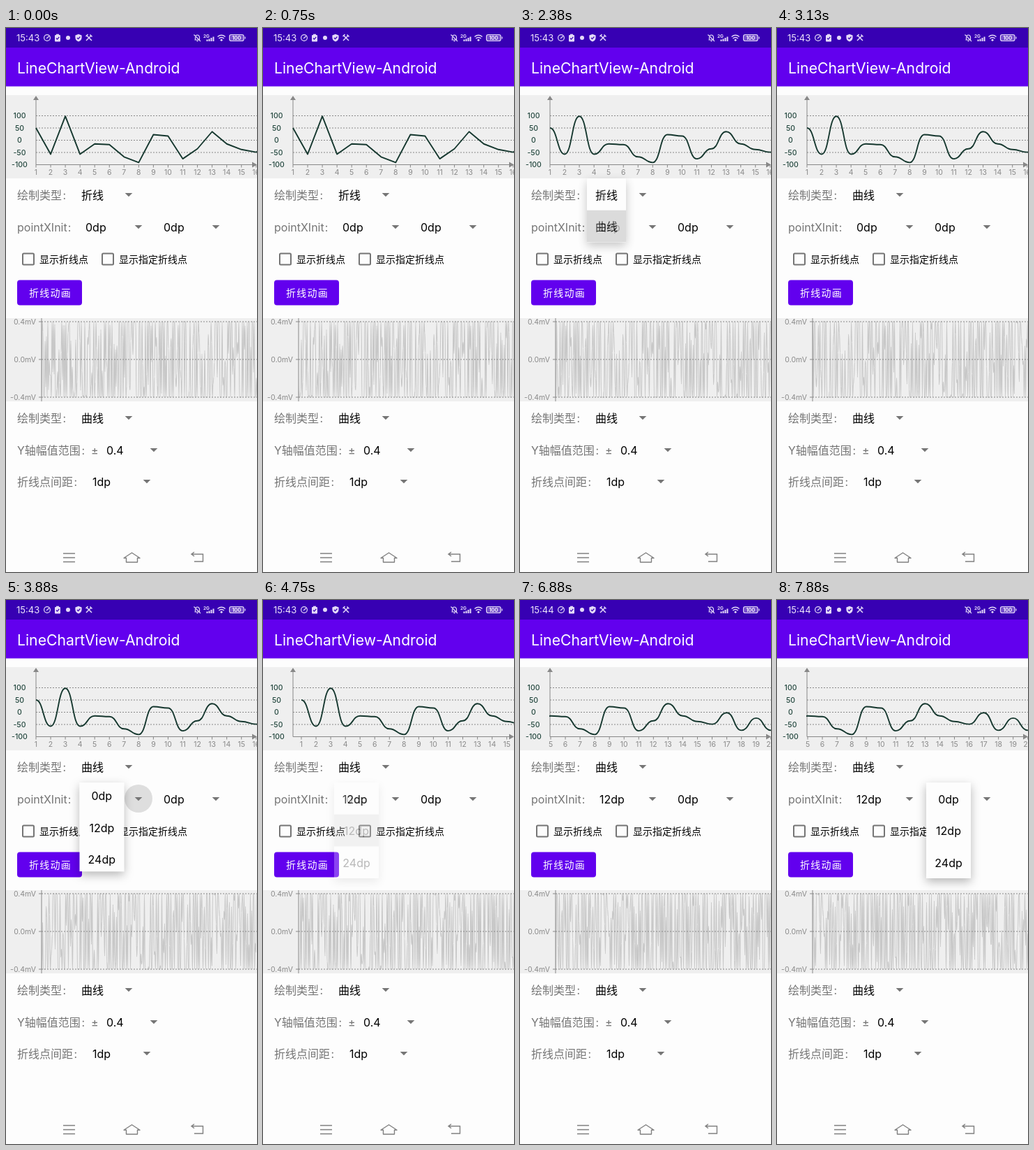
An HTML page for the animation above (8000 ms loop, 360 by 778 pixels).

```html
<!DOCTYPE html>
<html lang="zh-CN">
<head>
<meta charset="utf-8">
<title>LineChartView-Android</title>
<style>
html, body { margin: 0; width: 100%; height: 100%; overflow: hidden; background: #fdfdfd; }
svg { display: block; width: 100vw; height: 100vh; font: 16px Inter, "Noto Sans CJK SC", "Noto Sans CJK", sans-serif; }
.label { fill: #757575; }
.small { font-size: 14px; }
.tick { font-size: 10.5px; fill: #8a8a8a; }
.level { fill: #24483f; font-weight: 500; }
.mid { text-anchor: middle; }
.end { text-anchor: end; }
.axis { stroke: #888; fill: none; }
.dash { stroke-dasharray: 2 2; }
.arrow { fill: #757575; }
.icon { fill: none; stroke: #e4daf8; stroke-width: 1.2; }
.solid { fill: #e4daf8; stroke: none; }
.nav { fill: none; stroke: #808080; stroke-width: 1.4; }
.box { fill: none; stroke: #757575; stroke-width: 2; }
.ripple { fill: #dedede; }
</style>
</head>
<body>
<svg viewBox="0 0 360 778">
  <defs>
    <clipPath id="plot"><rect x="42" y="96" width="318" height="119"/></clipPath>
    <clipPath id="ticks"><rect x="38" y="190" width="322" height="25"/></clipPath>
    <clipPath id="wavePlot"><rect x="51" y="415" width="309" height="119"/></clipPath>
    <clipPath id="menuClip"><rect id="menuMask"/></clipPath>
    <filter id="shadow" x="-60%" y="-40%" width="220%" height="180%">
      <feDropShadow dx="0" dy="5" stdDeviation="7" flood-opacity=".28"/>
    </filter>
  </defs>

  <rect width="360" height="778" fill="#fdfdfd"/>
  <rect width="360" height="28" fill="#3700b3"/>
  <rect y="28" width="360" height="55.5" fill="#6200ee"/>
  <text x="16" y="64.5" font-size="21.2" fill="#fff">LineChartView-Android</text>

  <!-- status bar -->
  <text id="clock" x="15" y="19" font-size="13" fill="#eee6fb"></text>
  <g class="icon">
    <circle cx="59" cy="14" r="4.4"/><path d="M58 15l4-3.5"/>
    <rect class="solid" x="70" y="10" width="8" height="9.5" rx="1"/>
    <rect class="solid" x="72" y="8.7" width="4" height="2"/>
    <path d="M72 14.5l1.5 1.6 2.8-3.2" stroke="#3700b3"/>
    <circle class="solid" cx="89" cy="14" r="3"/>
    <path class="solid" d="M104 8.8l4.6 1.8v3.2q0 4-4.6 5.7-4.6-1.7-4.6-5.7v-3.2z"/>
    <path d="M102 14l1.6 1.7 2.8-3.2" stroke="#3700b3"/>
    <path d="M115 18l7-7M123 18l-7-7M114.5 12l3-3M120.5 9.5l3 3" stroke-width="1.5"/>
    <path d="M270.5 17h7.5M271.5 17v-4q.5-3 3-3 2.5 0 3 3v4M273.5 18.7h2M269.5 9.5l9.5 9.5"/>
    <path d="M288.5 19v-2.5M291.5 19v-3.5M294.5 19v-5M297.5 19v-6.5" stroke-width="2"/>
    <path d="M303.5 12.5q5.5-4.5 11 0M305.3 15q3.7-3 7.4 0" stroke-width="1.5"/>
    <circle class="solid" cx="309" cy="17.3" r="1.5"/>
    <rect x="320.5" y="9.5" width="20.5" height="9" rx="2.5" fill="#e4daf8" fill-opacity=".35"/>
    <path d="M343 12.5v3"/>
  </g>
  <text x="283" y="14" font-size="6.5" font-weight="700" fill="#e4daf8">2G</text>
  <text x="330.7" y="16.7" font-size="7.5" font-weight="600" class="mid" fill="#fff">100</text>

  <!-- upper chart -->
  <rect y="96" width="360" height="119" fill="#efefef"/>
  <g id="grid"></g>
  <g clip-path="url(#ticks)"><g id="scale"></g></g>
  <path class="axis" d="M43 100V195.5H356"/>
  <path fill="#888" d="M43 97l-4 6h8zM360 195.5l-7-4v8z"/>
  <g clip-path="url(#plot)"><path id="line" fill="none" stroke="#16382f" stroke-width="1.9" stroke-linejoin="round"/></g>

  <!-- controls -->
  <g class="label">
    <text x="16" y="245">绘制类型<tspan dx="1.5">:</tspan></text>
    <text x="16" y="290.5">pointXInit<tspan dx="1">:</tspan></text>
    <text x="16" y="564">绘制类型<tspan dx="1.5">:</tspan></text>
    <text x="16" y="609.5">Y轴幅值范围<tspan dx="1.5">:</tspan></text>
    <text x="122" y="609.5">±</text>
    <text x="16" y="655">折线点间距<tspan dx="1.5">:</tspan></text>
  </g>
  <text id="kind" x="108" y="245"></text>
  <text id="inset" x="114" y="290.5"></text>
  <text x="226" y="290.5">0dp</text>
  <text x="108" y="564">曲线</text>
  <text x="144" y="609.5">0.4</text>
  <text x="124" y="655">1dp</text>
  <circle id="ripple" class="ripple" r="20"/>
  <g id="arrows" class="arrow"></g>
  <rect class="box" x="24" y="322.5" width="16" height="16" rx="1.5"/>
  <rect class="box" x="138" y="322.5" width="16" height="16" rx="1.5"/>
  <text class="small" x="48" y="336">显示折线点</text>
  <text class="small" x="162" y="336">显示指定折线点</text>
  <rect x="16" y="360.5" width="93" height="36" rx="4" fill="#6200ee"/>
  <text class="small" x="33" y="384" fill="#fff" font-weight="500" letter-spacing="1.25">折线动画</text>

  <!-- lower chart -->
  <rect y="415" width="360" height="119" fill="#efefef"/>
  <g clip-path="url(#wavePlot)"><path id="wave" fill="none" stroke="#c8c8c8" stroke-width="1.1"/></g>
  <g id="waveGrid"></g>
  <path class="axis" d="M51 415V534"/>

  <!-- navigation bar -->
  <path class="nav" d="M82 751.5h17M82 757.5h17M82 763.5h17"/>
  <path class="nav" d="M180.5 750.5l11.5 7.500h-3.500v6h-16v-6h-3.500z" stroke-linejoin="round"/>
  <path class="nav" d="M270 749.5l-4 3 4 3M266 752.5h16.500v10.500h-12.500"/>

  <g id="menu" filter="url(#shadow)"><g clip-path="url(#menuClip)">
    <rect id="sheet" fill="#fdfdfd"/>
    <rect id="picked" height="45.7" fill="#d3d3d3"/>
    <g id="items" class="mid"></g>
  </g></g>
</svg>
<script>
const LOOP = 8000, STEP = 125, UNIT = 21.05, ROW = 45.7;
const levels = [50, -57, 98, -57, -15, -18, -68, -91, 23, 17, -76, -35, 35, -15, -38, -49, -2, -74, -24, -74, -40];
const DP = ['0dp', '12dp', '24dp'];
const menus = [
  { open: 1383, close: 2345, x: 96, y: 215, w: 56, rows: ['折线', '曲线'], pick: 1, knob: [176, 238] },
  { open: 3721, close: 4640, x: 102, y: 261, w: 64, rows: DP, pick: 1, knob: [190, 284] },
  { open: 7420, close: 9000, x: 214, y: 261, w: 64, rows: DP, pick: 1, knob: [301, 284] }
];
const $ = id => document.getElementById(id);
const clamp = (v, lo = 0, hi = 1) => Math.min(hi, Math.max(lo, v));
const set = (el, attrs) => { for (const k in attrs) el.setAttribute(k, attrs[k]); };
const levelY = v => 160.5 - v * 0.35;

function hash(n) {
  const s = Math.sin(n * 127.1 + 31.7) * 43758.5453;
  return s - Math.floor(s);
}

// Cubic segments with level tangents, or plain straight segments.
function trace(points, smooth) {
  return points.map(([x, y], i) => {
    if (!i) return `M${x} ${y}`;
    if (!smooth) return `L${x} ${y}`;
    const [px, py] = points[i - 1], m = (px + x) / 2;
    return `C${m} ${py} ${m} ${y} ${x} ${y}`;
  }).join('');
}

function buildStatic() {
  $('grid').innerHTML = [100, 50, 0, -50, -100].map(v => {
    const y = levelY(v);
    const rule = v > -100 ? `<path class="axis dash" d="M43 ${y}H360"/>` : '';
    return `${rule}<text class="tick level mid" x="19.5" y="${y + 3.8}">${v}</text>`;
  }).join('');
  $('scale').innerHTML = levels.map((_, i) => {
    const x = 43 + i * UNIT;
    return `<path class="axis" d="M${x} 195.5v4"/><text class="tick mid" x="${x}" y="210">${i + 1}</text>`;
  }).join('');
  $('waveGrid').innerHTML = ['0.4mV', '0.0mV', '-0.4mV'].map((s, i) => {
    const y = 420 + i * 54;
    return `<path class="axis dash" d="M51 ${y}H360"/><path class="axis" d="M47 ${y}h4"/>
      <text class="tick end" x="43" y="${y + 3.8}">${s}</text>`;
  }).join('');
  $('arrows').innerHTML = [[176, 238], [190, 284], [301, 284], [176, 557], [212, 603], [202, 648]]
    .map(([x, y]) => `<path d="M${x - 5.3} ${y - 2}h10.6l-5.3 5.3z"/>`).join('');
}

// Clipped random signal, one sample per unit, running to the left.
function drawWave(t) {
  const shift = t * 0.06, first = Math.floor(shift), points = [];
  for (let i = first - 1; i < first + 312; i++) {
    const v = clamp((hash(i) - 0.5) * 5, -1, 1);
    points.push([+(51 + i - shift).toFixed(2), +(474 - v * 54).toFixed(1)]);
  }
  set($('wave'), { d: trace(points, true) });
}

function drawMenu(t) {
  const m = menus.find(m => t >= m.open && t < m.close + 150);
  const ring = menus.find(m => t >= m.open - 110 && t < m.open + 330);
  $('ripple').style.display = ring ? '' : 'none';
  if (ring) set($('ripple'), { cx: ring.knob[0], cy: ring.knob[1] });
  $('menu').style.display = m ? '' : 'none';
  if (!m) return;

  const p = clamp((t - m.open) / 260), rest = (1 - p) ** 2;
  const x = m.x + 20 * rest, top = m.y - 28 * rest;
  const h = m.rows.length * ROW - 60 * rest;
  const leave = clamp((t - m.close) / 150);
  set($('menuMask'), { x, y: m.y, width: m.w, height: h });
  set($('sheet'), { x, y: m.y, width: m.w, height: h });
  set($('picked'), { x, y: top + m.pick * ROW, width: m.w, opacity: t > m.close - 110 ? 1 : 0 });
  $('items').innerHTML = m.rows.map((s, i) =>
    `<text x="${x + m.w / 2}" y="${top + (i + 0.5) * ROW + 6.7}">${s}</text>`).join('');
  set($('menu'), { opacity: Math.min(1, p * 2) * (1 - leave) });
}

function render(t) {
  const smooth = t >= menus[0].close, inset = t >= menus[1].close ? 12 : 0;
  const s = clamp((t - 5800) / 850), drag = 95.2 * s * s * (3 - 2 * s);
  const dx = inset - drag;
  set($('line'), { d: trace(levels.map((v, i) => [43 + dx + i * UNIT, levelY(v)]), smooth) });
  set($('scale'), { transform: `translate(${dx})` });
  $('kind').textContent = smooth ? '曲线' : '折线';
  $('inset').textContent = inset + 'dp';
  $('clock').textContent = t < 6250 ? '15:43' : '15:44';
  drawWave(t);
  drawMenu(t);
}

buildStatic();
const start = performance.now();
let shown = -1;
function tick() {
  const t = Math.floor((performance.now() - start) % LOOP / STEP) * STEP;
  if (t !== shown) render(shown = t);
  requestAnimationFrame(tick);
}
tick();
</script>
</body>
</html>
```
